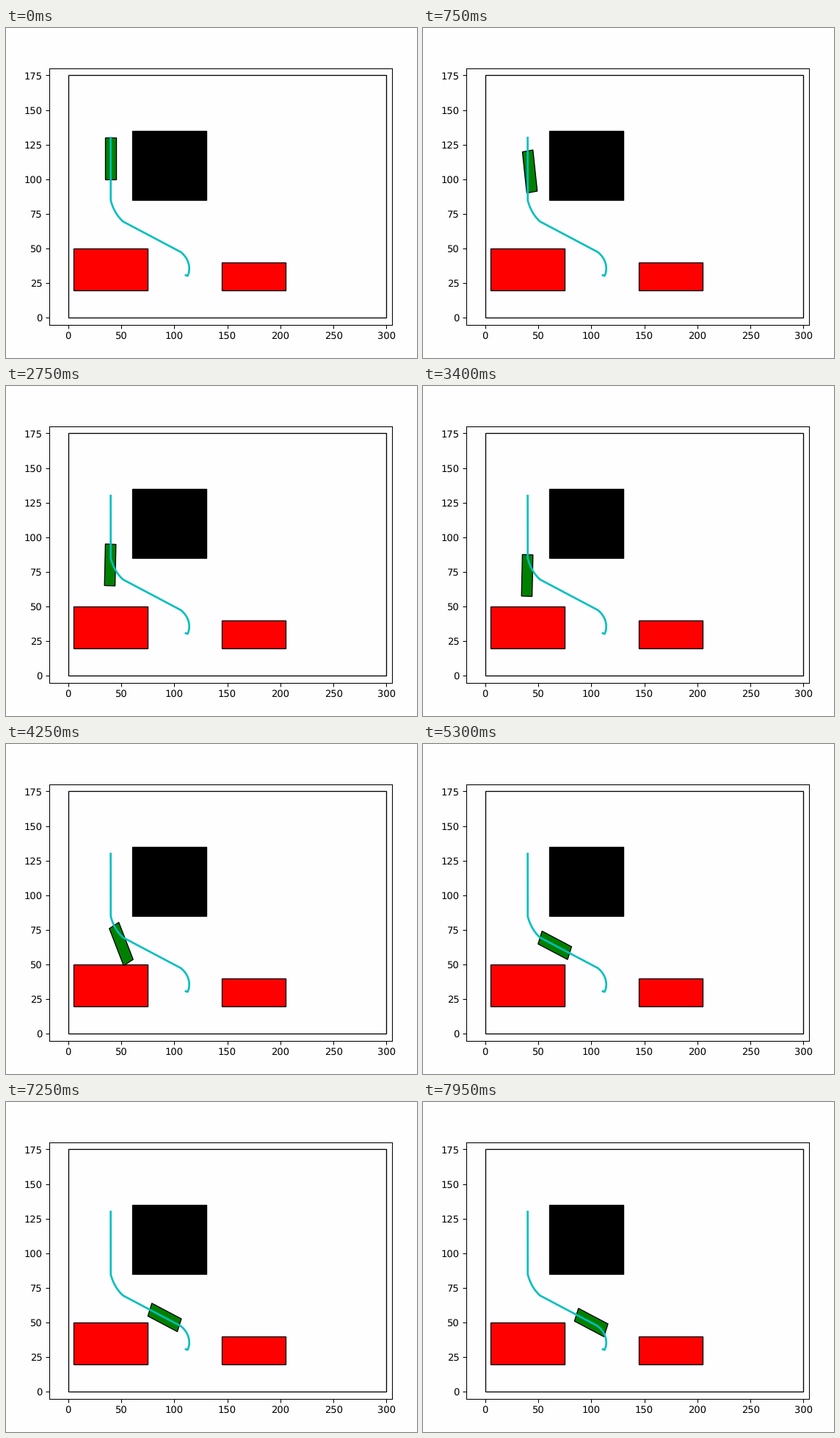
Recreate the animation shown at these times as a matplotlib script. Size 560 px wide and 449 px high, loop 8 s.

```python
import numpy as np
import matplotlib.pyplot as plt
from matplotlib.animation import FuncAnimation
from matplotlib.patches import Polygon, Rectangle

W, H, DPI = 560, 449, 100
FRAMES, INTERVAL = 160, 50
ZOOM = 0.943
LENGTH, WIDTH = 30, 10
STEP = 0.1
PAPER = "#fefdff"

plt.rcParams.update({
    "font.family": "DejaVu Sans",
    "font.size": 10 * ZOOM,
    "text.hinting": "none",
    "axes.linewidth": 0.8 * ZOOM,
})
for axis in ("xtick", "ytick"):
    plt.rcParams[axis + ".major.size"] = 3.5 * ZOOM
    plt.rcParams[axis + ".major.pad"] = 3.5 * ZOOM
    plt.rcParams[axis + ".major.width"] = 0.8 * ZOOM


def leg(length, start, end, power=1):
    """Headings along a stretch of route, in degrees from straight down."""
    n = round(length / STEP)
    u = (np.arange(n) + 0.5) / n
    return start + (end - start) * u ** power


def direction(degrees):
    a = np.radians(degrees)
    return np.array([np.sin(a), -np.cos(a)])


def smooth(u):
    u = np.clip(u, 0, 1)
    return u * u * (3 - 2 * u)


# The route is traced by following its heading from the start point
headings = np.concatenate([
    leg(45, 0, 0),
    leg(19.8, 18, 56),
    leg(58.7, 68, 68),
    leg(20.6, 56, -34, 1.5),
    leg(1.8, -105, -105),
])
moves = STEP * direction(headings).T
route = np.array([40, 130]) + np.vstack([(0, 0), np.cumsum(moves, axis=0)])
dist = STEP * np.arange(len(route))


def vehicle(i):
    """Corners of the vehicle, whose rear midpoint rides on the route."""
    s = np.interp(i, (0, 55, 106, 159), (0, 35, 64.8, 101.8))
    rear = np.array([np.interp(s, dist, c) for c in route.T])
    sway = 10 * np.sin(np.pi * i / 52) * (1 - smooth((i - 50) / 25))
    turn = sway + 68 * smooth((i - 70) / 35)
    ahead = LENGTH * direction(turn)
    side = WIDTH / 2 * direction(turn + 90)
    return [rear - side, rear + side, rear + ahead + side, rear + ahead - side]


fig = plt.figure(figsize=(W / DPI, H / DPI), dpi=DPI, facecolor=PAPER)
left, right, top, bottom = 58.8, 526.4, 55.4, 403.7
ax = fig.add_axes([left / W, 1 - bottom / H, (right - left) / W, (bottom - top) / H],
                  facecolor=PAPER)
ax.set_xlim(-18, 305.6)
ax.set_ylim(-5, 179.8)
ax.set_xticks(range(0, 301, 50))
ax.set_yticks(range(0, 176, 25))


def box(x, y, w, h, color):
    ax.add_patch(Rectangle((x, y), w, h, fc=color, ec="black", lw=ZOOM))


box(0, 0, 300, 175, "none")
box(60, 85, 70, 50, "black")
box(5, 20, 70, 30, "red")
box(145, 20, 60, 20, "red")

car = ax.add_patch(Polygon(vehicle(0), closed=True, fc="green", ec="black",
                           lw=ZOOM, zorder=2))
ax.plot(*route.T, color="#00bfbf", lw=1.9, zorder=3)


def update(i):
    car.set_xy(vehicle(i))
    return [car]


anim = FuncAnimation(fig, update, frames=FRAMES, interval=INTERVAL,
                     repeat=True, repeat_delay=0, blit=False)
plt.show()
```
